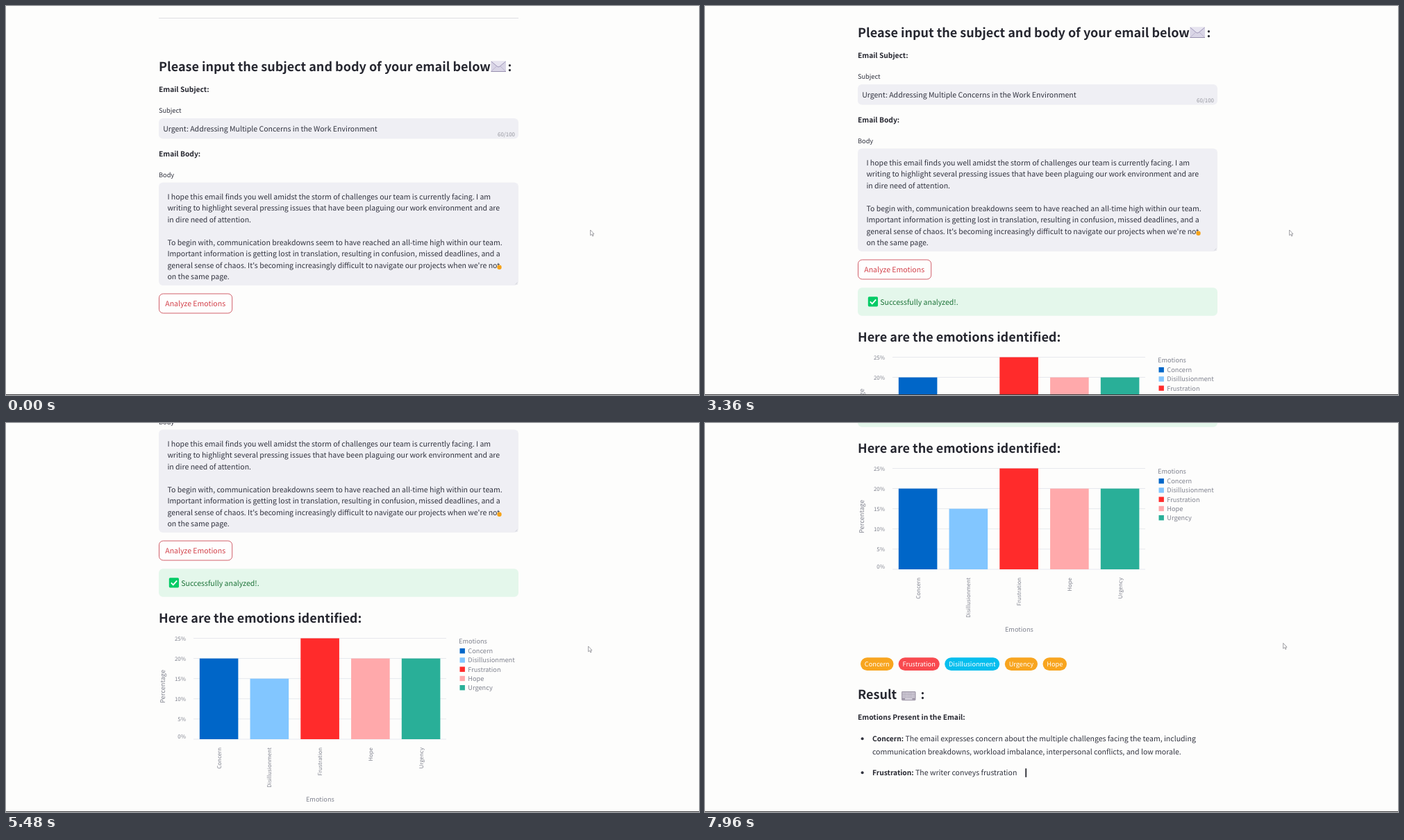
Animation of 998x561 px, one loop 8 s. Source, as an HTML page:

```html
<!DOCTYPE html>
<html lang="en">
<head>
<meta charset="utf-8">
<title>Email emotion analysis</title>
<style>
  html, body { margin: 0; width: 100%; height: 100%; overflow: hidden; background: #fdfdfc; }
  svg { display: block; width: 998px; height: 561px; }
  text {
    font-family: "Noto Sans CJK JP", "Noto Sans CJK SC", "Noto Sans CJK KR", "Noto Sans CJK", "Noto Sans", sans-serif;
    white-space: pre;
    text-rendering: geometricPrecision;
  }
</style>
</head>
<body>
<svg id="stage" viewBox="0 0 998 561">
  <g id="page"></g>
  <path id="pointer" d="M0 0V7.8L1.9 6.2L3.2 9L4.4 8.4L3.2 5.8H5.4Z" fill="#fff" stroke="#8a8a8e" stroke-width=".8"/>
  <rect y="560" width="998" height="1" fill="#3c3c3e"/>
</svg>
<script>
const NS = 'http://www.w3.org/2000/svg';
const LOOP = 8000;
const INK = '#31333f', GRAY = '#80838f', BOX = '#efeff4';
// Text sizes: headings, strong labels, body, small labels, axis ticks
const H = 18, STRONG = 10.25, BODY = 10.54, SMALL = 9.22, TICK = 7.9;

const page = document.getElementById('page');
const pointer = document.getElementById('pointer');

function add(parent, tag, attrs, content) {
  const el = document.createElementNS(NS, tag);
  for (const k in attrs) el.setAttribute(k, attrs[k]);
  if (content) el.textContent = content;
  parent.appendChild(el);
  return el;
}
const rect = (g, x, y, width, height, fill, rx = 0) =>
  add(g, 'rect', { x, y, width, height, fill, rx });
const path = (g, d, stroke, width = 1, fill = 'none') =>
  add(g, 'path', { d, stroke, 'stroke-width': width, fill });
const text = (g, x, y, s, size, fill = INK, more = {}) =>
  add(g, 'text', { x, y, 'font-size': size, fill, ...more }, s);
const strong = (g, x, y, s, size = STRONG) =>
  text(g, x, y, s, size, '#262730', { 'font-weight': 700 });
const group = (parent = page) => add(parent, 'g', {});

function drawForm(g) {
  rect(g, 220, 17, 518, 1, '#dedee2');
  strong(g, 220, 94, 'Please input the subject and body of your email below', H);
  strong(g, 722.5, 94, ':', H);
  rect(g, 698.4, 79.4, 21.6, 15.4, '#d9d5e6', 1);
  path(g, 'M699 94L706.5 87M719.4 94L712 87', '#b9b2cd', .9);
  path(g, 'M698.8 80L707.4 87.2Q709.2 88.6 711 87.2L719.6 80', '#9f97b8', 1, '#e7e4f0');
  path(g, 'M698.4 94.5H720', '#9087a8', .9);

  strong(g, 220, 124.3, 'Email Subject:');
  text(g, 220, 153.9, 'Subject', SMALL);
  rect(g, 220, 162, 518, 29.6, BOX, 5.9);
  text(g, 226.2, 181, 'Urgent: Addressing Multiple Concerns in the Work Environment', BODY);
  text(g, 733, 188, '60/100', TICK, '#94959d', { 'text-anchor': 'end' });

  strong(g, 220, 217, 'Email Body:');
  text(g, 220, 246.5, 'Body', SMALL);
  rect(g, 220, 254.5, 518, 148.5, BOX, 5.9);
  [
    'I hope this email finds you well amidst the storm of challenges our team is currently facing. I am',
    'writing to highlight several pressing issues that have been plaguing our work environment and are',
    'in dire need of attention.',
    '',
    'To begin with, communication breakdowns seem to have reached an all-time high within our team.',
    'Important information is getting lost in translation, resulting in confusion, missed deadlines, and a',
    "general sense of chaos. It's becoming increasingly difficult to navigate our projects when we're not",
    'on the same page.'
  ].forEach((s, i) => text(g, 232.4, 279 + i * 16.48, s, BODY));
  add(g, 'circle', { cx: 710.5, cy: 376.7, r: 3.2, fill: '#f5a31a' });
  path(g, 'M733.6 401.6L736.6 398.6M735.6 401.8L736.8 400.6', '#b9bac2', .6);

  add(g, 'rect', { x: 220.5, y: 415, width: 105.2, height: 28, rx: 5.9, fill: '#fefefe', stroke: '#d2606a' });
  text(g, 229.3, 433, 'Analyze Emotions', BODY, '#d3404a');
}

function drawSuccess(g) {
  rect(g, 220, 455.3, 518, 40.4, '#e4f7eb', 5.9);
  rect(g, 234.8, 468.2, 14.2, 14.2, '#04cb66', 1.6);
  path(g, 'M237.8 475.4L240.8 478.4L246.2 472.4', '#fff', 1.8);
  text(g, 252.3, 479.5, 'Successfully analyzed!.', BODY, '#1b7237');
  strong(g, 220, 533, 'Here are the emotions identified:', H);
}

function drawChart(g) {
  const base = 701, unit = 29.1;
  const bars = [
    ['Concern', 4, '#0066c8'], ['Disillusionment', 3, '#82c6ff'], ['Frustration', 5, '#ff2b2b'],
    ['Hope', 4, '#ffa9ab'], ['Urgency', 4, '#29af98']
  ];
  for (let i = 0; i <= 5; i++) {
    const y = base - i * unit;
    rect(g, 270, y - .4, 364, .8, '#e2e4ea');
    text(g, 259, (i ? y : y - 4) + 3.2, i * 5 + '%', TICK, GRAY, { 'text-anchor': 'end' });
  }
  bars.forEach(([name, n, color], i) => {
    const x = 278.8 + i * 72.75, mid = x + 27.8, ly = 573.7 + i * 13.25;
    rect(g, x, base - n * unit, 55.6, n * unit, color);
    text(g, 0, 0, name, TICK, GRAY, { 'text-anchor': 'end', transform: `translate(${mid + 3} 713) rotate(-90)` });
    rect(g, 653.5, ly - 3.7, 7.4, 7.4, color);
    text(g, 665.3, ly + 3.5, name, SMALL, GRAY);
  });
  text(g, 0, 0, 'Percentage', SMALL, GRAY, { 'text-anchor': 'middle', transform: 'translate(229 625) rotate(-90)' });
  text(g, 452.4, 791, 'Emotions', SMALL, GRAY, { 'text-anchor': 'middle' });
  text(g, 652, 563.4, 'Emotions', SMALL, GRAY);
}

function drawResult(g) {
  [
    ['Concern', 224, 47.5, '#f8a51f'], ['Frustration', 278.6, 59.2, '#f84a4f'],
    ['Disillusionment', 345.2, 79, '#06beee'], ['Urgency', 431.8, 47.2, '#f8a51f'], ['Hope', 486.5, 34.5, '#f8a51f']
  ].forEach(([name, x, w, color]) => {
    rect(g, x, 828.2, w, 18.8, color, 9.4);
    text(g, x + w / 2, 841, name, SMALL, '#fff', { 'text-anchor': 'middle' });
  });
  strong(g, 220, 888, 'Result', H);
  strong(g, 310.5, 888, ':', H);
  rect(g, 283, 877, 20.5, 13.2, '#a39cac', 1.4);
  for (let r = 0; r < 3; r++)
    for (let c = 0; c < 8; c++) rect(g, 284.5 + c * 2.25, 878.6 + r * 2.8, 1.7, 2, '#e3dfe9', .3);
  rect(g, 288, 887, 10.5, 1.8, '#e3dfe9', .3);
}

// Streamed answer: [x, baseline, strong part, plain part]
const answer = [
  [220, 918, 'Emotions Present in the Email:', ''],
  [241, 949, 'Concern:', ' The email expresses concern about the multiple challenges facing the team, including'],
  [241, 967.8, '', 'communication breakdowns, workload imbalance, interpersonal conflicts, and low morale.'],
  [241, 998, 'Frustration:', ' The writer conveys frustration']
];
const wordsOf = s => s.match(/\s*\S+/g) || [];

function makeLine(g, [x, y, head, rest]) {
  const el = text(g, x, y, '', BODY);
  const b = add(el, 'tspan', { 'font-weight': 700, 'font-size': STRONG, fill: '#262730' });
  const r = add(el, 'tspan', {});
  const dot = head && rest ? add(g, 'circle', { cx: 226.6, cy: y - 3.7, r: 2, fill: INK }) : null;
  return { x, y, el, b, r, dot, head: wordsOf(head), rest: wordsOf(rest) };
}

const form = group(), success = group(), chart = group(), result = group();
drawForm(form);
drawSuccess(success);
drawChart(chart);
drawResult(result);
const lines = answer.map(a => makeLine(result, a));
const caret = rect(result, 0, 0, 1.8, 12.6, '#2a2b33');

let typed = -1;
function typeWords(n) {
  if (n === typed) return;
  typed = n;
  caret.style.display = n > 0 ? '' : 'none';
  for (const l of lines) {
    const h = l.head.length, total = h + l.rest.length;
    const k = Math.max(0, Math.min(n, total));
    l.b.textContent = l.head.slice(0, k).join('');
    l.r.textContent = l.rest.slice(0, Math.max(0, k - h)).join('');
    if (l.dot) l.dot.style.display = k ? '' : 'none';
    if (k) {
      caret.setAttribute('x', l.x + l.el.getComputedTextLength() + 12);
      caret.setAttribute('y', l.y - 9.8);
    }
    n -= total;
  }
}

const STEP = 49, GLIDE = 160;
const wheel = [2520, 3520, 4100, 4780, 5260, 5640, 6160, 6680, 7200, 7720];
const ease = p => p < .5 ? 2 * p * p : 1 - 2 * (1 - p) * (1 - p);
const clamp = p => Math.max(0, Math.min(1, p));
const scrollAt = t => wheel.reduce((sum, w) => sum + STEP * ease(clamp((t - w) / GLIDE)), 0);

const track = [[0, 841.6, 323], [3520, 841.6, 323], [4640, 840.6, 322.6], [5480, 838.6, 322], [7000, 835, 319], [8000, 832.6, 317.4]];
function pointerAt(t) {
  const i = track.findIndex(p => p[0] > t), a = track[i - 1], b = track[i];
  const p = (t - a[0]) / (b[0] - a[0]);
  return [a[1] + (b[1] - a[1]) * p, a[2] + (b[2] - a[2]) * p];
}

function draw(t) {
  success.style.display = t >= 120 ? '' : 'none';
  chart.style.display = t >= 240 ? '' : 'none';
  result.style.display = t >= 3000 ? '' : 'none';
  page.setAttribute('transform', `translate(0 ${-scrollAt(t)})`);
  pointer.setAttribute('transform', `translate(${pointerAt(t).join(' ')})`);
  typeWords(Math.max(0, Math.floor((t - 4700) / 100)));
}

const start = performance.now();
function tick() {
  draw((performance.now() - start) % LOOP);
  requestAnimationFrame(tick);
}
tick();
</script>
</body>
</html>
```
